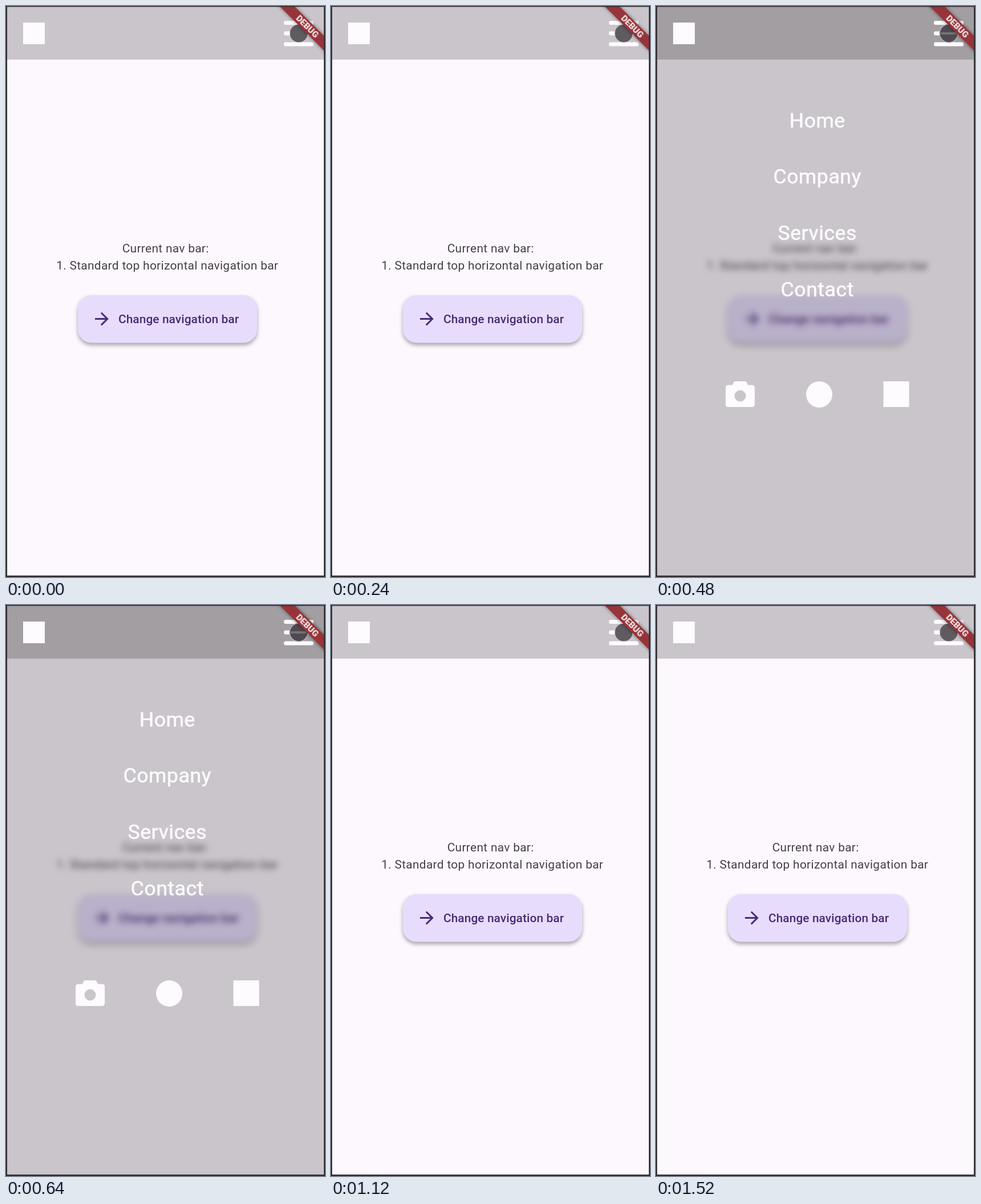
An HTML page that plays this animation: 559 px wide and 1001 px high, repeating every 1600 ms.

```html
<!DOCTYPE html>
<html lang="en">
<head>
<meta charset="utf-8">
<title>Navigation menu toggle</title>
<style>
  html, body { margin: 0; width: 100%; height: 100%; overflow: hidden; background: #fdf7fe; }
  svg { display: block; width: 100vw; height: 100vh; font-family: Roboto, sans-serif; }

  .soft { filter: blur(.55px); }
  .label { font-size: 20.8px; letter-spacing: .35px; fill: #434044; text-anchor: middle; }
  .button { fill: #e8dcfd; filter: drop-shadow(0 4px 3.5px rgba(0, 0, 0, .34)); }
  .action { font-size: 20.8px; font-weight: 500; letter-spacing: .12px; }
  .accent { fill: #482b73; }
  .links { font-size: 35.7px; letter-spacing: .5px; text-anchor: middle; stroke: #fdfbfe; stroke-width: .5; }
  .white { fill: #fdfbfe; }
  .shade { fill: rgba(0, 0, 0, .2); }
  .tag { font-size: 15.2px; font-weight: 900; text-anchor: middle; fill: #f4e4e6; }
  .ribbon { fill: #97343a; filter: drop-shadow(0 0 3px rgba(0, 0, 0, .5)); }

  /* The menu opens and closes as a hard cut. */
  .menu { animation: show 1.6s step-end infinite; }
  .page { animation: blur 1.6s step-end infinite; }
  @keyframes show {
    0%, 70%, 100% { visibility: hidden; }
    20% { visibility: visible; }
  }
  @keyframes blur {
    0%, 70%, 100% { filter: none; }
    20% { filter: blur(5.8px); }
  }
</style>
</head>
<body>
<svg viewBox="0 0 559 1001" preserveAspectRatio="none">
  <rect width="559" height="1001" fill="#fdf7fe"/>

  <g class="page">
    <rect class="button" x="126" y="507" width="314" height="83.5" rx="23.8"/>
    <g class="soft">
      <text class="label" x="279.7" y="432">Current nav bar:</text>
      <text class="label" x="282.7" y="462">1. Standard top horizontal navigation bar</text>
      <path class="accent" transform="translate(150 530.7) scale(1.488)"
        d="M12 4l-1.41 1.41L16.17 11H4v2h12.17l-5.58 5.59L12 20l8-8z"/>
      <text class="action accent" x="197" y="556">Change navigation bar</text>
    </g>
  </g>

  <g class="menu">
    <rect class="shade" width="559" height="1001"/>
    <g class="links white soft">
      <text x="282.7" y="212.7">Home</text>
      <text x="282.7" y="311.4">Company</text>
      <text x="282.7" y="410">Services</text>
      <text x="282.7" y="508.7">Contact</text>
    </g>
    <g class="white soft">
      <path fill-rule="evenodd" d="M127 664.5h7l2-4.5q1-2 3-2h17q2 0 3 2l2 4.5h7q5 0 5 5v28.5q0 5-5 5h-41q-5 0-5-5v-28.5q0-5 5-5z
        M137.5 683.5a10 10 0 1 0 20 0a10 10 0 1 0-20 0z"/>
      <circle cx="286" cy="681" r="23"/>
      <rect x="398.5" y="658" width="45" height="45"/>
    </g>
  </g>

  <rect class="shade" width="559" height="94"/>
  <rect class="white" x="30" y="29" width="38" height="38"/>
  <g class="white soft">
    <rect x="487" y="26" width="52" height="7" rx="3"/>
    <rect x="487" y="44.5" width="52" height="7" rx="3"/>
    <rect x="487" y="63.5" width="52" height="7" rx="3"/>
  </g>

  <g class="soft">
    <circle cx="513" cy="48" r="15.5" fill="#5f5b60"/>
    <g class="menu">
      <circle cx="513" cy="48" r="16" fill="#4e4a4f" stroke="#b5b0b5" stroke-width="1.5"/>
      <rect x="499" y="46" width="28" height="4" fill="#fff" fill-opacity=".22"/>
    </g>
  </g>

  <g class="soft" transform="translate(528 36) rotate(45)">
    <rect class="ribbon" x="-70" y="-9" width="140" height="18"/>
    <text class="tag" y="5.4">DEBUG</text>
  </g>

  <path fill="#2d2b2e" fill-rule="evenodd" d="M0 0H559V1001H0z M2 1.5V998.5H557V1.5z"/>
</svg>
</body>
</html>
```
